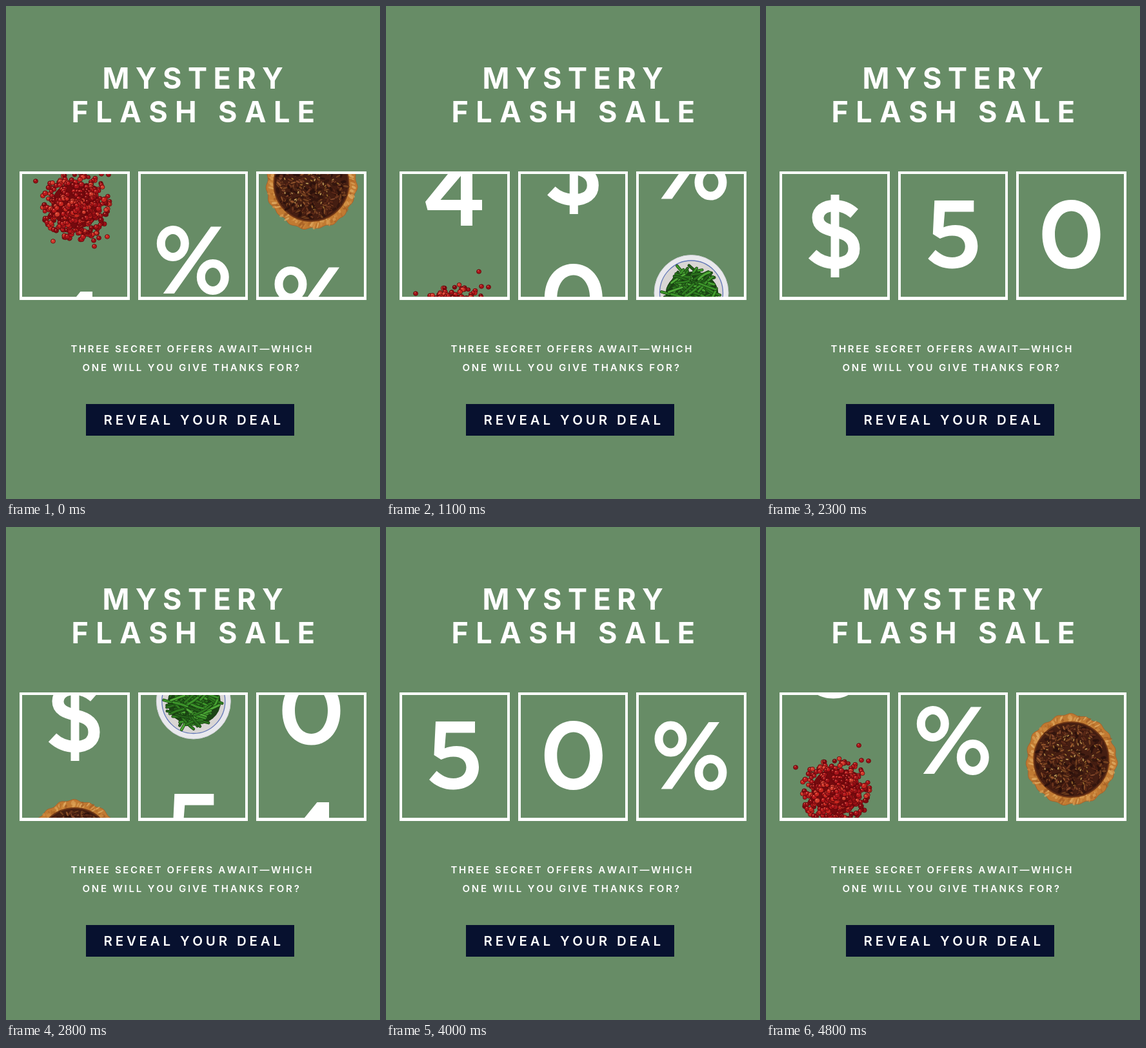
These frames come from a looping animation (580 by 763 pixels, 5100 ms). An HTML page:

```html
<!DOCTYPE html>
<html lang="en">
<head>
<meta charset="utf-8">
<title>Mystery Flash Sale</title>
<style>
  html, body { margin: 0; width: 100%; height: 100%; overflow: hidden; background: #678c66; }
  svg { display: block; width: 100%; height: 100%; }
  text { font-family: Inter, "Open Sans", sans-serif; fill: #fff; font-kerning: none; }
  .title { font-size: 45px; font-weight: 700; }
  .body { font-size: 15px; font-weight: 600; }
  .cta { font-size: 20.5px; font-weight: 600; letter-spacing: 4.8px; }
</style>
</head>
<body>
<svg id="stage" viewBox="0 0 580 763" xmlns="http://www.w3.org/2000/svg">
  <defs>
    <g id="zero" fill="#fff" fill-rule="evenodd">
      <path d="M0-53.5C27-53.5 45-31 45 0S27 53.5 0 53.5-45 31-45 0-27-53.5 0-53.5ZM0-36C-15-36-25.5-21-25.5 0S-15 36 0 36 25.5 21 25.5 0 15-36 0-36Z"/>
    </g>
    <g id="four" fill="#fff" fill-rule="evenodd">
      <path d="M9-52H27.5V12H42.5V28H27.5V52H9.5V28H-42L-45.5 15ZM9.5-25L-22 12H9.5Z"/>
    </g>
    <g id="five" fill="#fff">
      <path d="M-29.5-52.5H31.5V-35H-13.5L-15.5-11C-10-13-4-14.5 3-14.5C23-14.5 37.5-2 37.5 18C37.5 39 22 53-2 53C-18 53-30 47-39.5 37.5L-28 24C-20 31-12 35.5-2 35.5C10 35.5 18 29 18 18.5C18 8 10 2-2 2C-9 2-15 4-21 6.5L-32-.5Z"/>
    </g>
    <g id="dollar" fill="none" stroke="#fff" stroke-width="18">
      <path d="M30.5-32.5C22-40 12-44.5 0-44.5C-17-44.5-26-36-26-26C-26-12-14-8 2-4C20 0 30 7 30 22C30 36 19 44.5 1 44.5C-13 44.5-25 39.5-34.5 30.5"/>
      <path d="M.5-61.5V66.5" stroke-width="13"/>
    </g>
    <g id="percent" fill="none" stroke="#fff" stroke-width="13">
      <ellipse cx="-32" cy="-25.5" rx="18.5" ry="21"/>
      <ellipse cx="30" cy="26.5" rx="18.5" ry="21"/>
      <path d="M27-51.5H43.5L-30 52H-47Z" fill="#fff" stroke="none"/>
    </g>
    <g id="berries"></g>
    <g id="pie"></g>
    <g id="beans"></g>
  </defs>
  <rect width="580" height="763" fill="#678c66"/>
  <g id="reels"></g>
  <text class="title" x="149.5" y="128" letter-spacing="9.4">MYSTERY</text>
  <text class="title" x="101.5" y="180" letter-spacing="11.4">FLASH SALE</text>
  <text class="body" x="100.5" y="536" letter-spacing="2.6">THREE SECRET OFFERS AWAIT—WHICH</text>
  <text class="body" x="118.5" y="565" letter-spacing="2.8">ONE WILL YOU GIVE THANKS FOR?</text>
  <rect x="124" y="616" width="323" height="49" fill="#07112f"/>
  <text class="cta" x="151.5" y="648">REVEAL YOUR DEAL</text>
</svg>
<script>
const byId = id => document.getElementById(id);

function add(parent, tag, attrs) {
  const el = document.createElementNS('http://www.w3.org/2000/svg', tag);
  for (const key in attrs) el.setAttribute(key, attrs[key]);
  return parent.appendChild(el);
}

function seeded(seed) {
  return () => {
    seed = (seed * 1664525 + 1013904223) >>> 0;
    return seed / 4294967296;
  };
}

const pick = (list, rand) => list[Math.floor(rand() * list.length)];
const polar = (r, a) => [r * Math.cos(a), r * Math.sin(a)];

function drawBerries() {
  const g = byId('berries'), rand = seeded(41);
  const reds = ['#b8171b', '#9c1016', '#c9261f', '#820a10', '#d23a2c', '#a9141a'];
  const berry = (x, y, r) => {
    add(g, 'ellipse', { cx: x, cy: y, rx: r, ry: r * 0.94, fill: pick(reds, rand), stroke: '#5c070b', 'stroke-width': 0.8 });
    add(g, 'circle', { cx: x - r * 0.25, cy: y - r * 0.35, r: r * 0.27, fill: '#f07a66', opacity: 0.75 });
  };
  const strays = [[-60.5, -33.5], [37.5, -67.5], [41.5, -44.5], [52.5, -43.5], [-33.5, 59.5],
    [29.5, 58.5], [30.5, 67.5], [37.5, 54.5], [50.5, 52.5]];
  strays.forEach(([x, y]) => berry(x, y, 3.5));
  add(g, 'ellipse', { cx: 2, cy: 4, rx: 38, ry: 36, fill: '#750a0e' });
  Array.from({ length: 330 }, () => [54 * rand() ** 0.6, rand() * Math.PI * 2])
    .sort((a, b) => b[0] - a[0])
    .forEach(([r, a]) => {
      const [x, y] = polar(r, a);
      berry(x + 2, y * 0.97 + 5, 3 + rand() * 1.1);
    });
}

function drawPie() {
  const g = byId('pie'), rand = seeded(7);
  const edge = Array.from({ length: 144 }, (_, i) => {
    const a = i * Math.PI / 72;
    return polar(69.6 + 1.3 * Math.sin(a * 19) + Math.sin(a * 7 + 1), a).map(v => v.toFixed(1));
  });
  add(g, 'path', { d: 'M' + edge.join('L') + 'Z', fill: '#c17a32', stroke: '#a8622a' });
  for (let i = 0; i < 150; i++) {
    const a = rand() * Math.PI * 2, [x, y] = polar(59 + rand() * 9, a);
    add(g, 'ellipse', {
      rx: 2 + rand() * 3, ry: 1 + rand() * 1.5, opacity: 0.7,
      fill: pick(['#dca155', '#d08b40', '#b06a28', '#e2b068', '#a25c24'], rand),
      transform: `translate(${x} ${y}) rotate(${a * 180 / Math.PI + 25})`
    });
  }
  add(g, 'circle', { r: 58, fill: '#451e12', stroke: '#6d3516', 'stroke-width': 2 });
  const nuts = ['#6b351d', '#82472a', '#5a2817', '#2b110c', '#95562c', '#74401f', '#34160f'];
  const seeds = ['#b78a48', '#c9a45e', '#a0712f'];
  for (let i = 0; i < 430; i++) {
    const r = 54 * Math.sqrt(rand()), [x, y] = polar(r, rand() * Math.PI * 2);
    const isSeed = r < 44 && rand() < 0.36;
    add(g, 'ellipse', {
      rx: isSeed ? 2.6 : 3 + rand() * 2.5, ry: isSeed ? 1.3 : 1.3 + rand(),
      fill: pick(isSeed ? seeds : nuts, rand), stroke: '#32140d', 'stroke-width': 0.6,
      transform: `translate(${x} ${y}) rotate(${rand() * 180})`
    });
  }
}

function drawBeans() {
  const g = byId('beans'), rand = seeded(19);
  add(g, 'ellipse', { rx: 57.5, ry: 58.5, fill: '#e9e9ed', stroke: '#d3d4da' });
  add(g, 'ellipse', { rx: 49, ry: 50, fill: '#d9d6d4', stroke: '#6378b8', 'stroke-width': 1.3 });
  add(g, 'ellipse', { cx: 1, cy: 2, rx: 41, ry: 35, fill: '#1c4515' });
  const greens = ['#2f7d20', '#3c942a', '#235f19', '#4fa938', '#2a701d', '#45a030'];
  for (let i = 0; i < 115; i++) {
    const [x, y] = polar(35 * Math.sqrt(rand()), rand() * Math.PI * 2);
    const [dx, dy] = polar(9 + rand() * 6, (rand() - 0.55) * 2);
    const bend = (rand() - 0.5) * 9;
    const d = `M${x - dx} ${y - dy}Q${x} ${y + bend} ${x + dx} ${y + dy}`;
    const line = { d, fill: 'none', 'stroke-linecap': 'round' };
    add(g, 'path', { ...line, stroke: '#163c10', 'stroke-width': 4.6 });
    add(g, 'path', { ...line, stroke: pick(greens, rand), 'stroke-width': 3.2 });
  }
}

// Items sit along a looping strip; stops give its scroll at each beat.
const reels = [
  {
    left: 21, right: 192, center: 106.5, dir: 1, length: 1164.5,
    items: [['four', 0], ['berries', 190.5], ['dollar', 387], ['pie', 584.5], ['five', 782], ['berries', 975]],
    stops: [1024, 1094, 0, 65.5, 146, 226.5, 307, 387, 445, 525, 606, 694, 782, 852, 923]
  },
  {
    left: 205, right: 375, center: 290.8, dir: -1, length: 1185,
    items: [['zero', 0], ['dollar', 197], ['five', 396], ['beans', 592], ['zero', 791.5], ['percent', 988.5]],
    stops: [1028, 1106, 0, 99, 194, 289, 342, 396, 508, 600, 693.5, 742, 791.5, 890, 965]
  },
  {
    left: 388, right: 559, center: 473.5, dir: 1, length: 1167,
    items: [['percent', 0], ['beans', 197.5], ['zero', 398], ['four', 592], ['percent', 789], ['pie', 986]],
    stops: [1064.5, 1116, 0, 107, 193, 280, 339, 398, 467.5, 528, 589.5, 689, 789, 890, 979.5]
  }
];
const MIDDLE = 353.5, LOOP = 5100;
const beats = [0, 300, 600, 1100, 1400, 1700, 2000, 2300, 2800, 3100, 3400, 3700, 4000, 4500, 4800];

function buildReel(reel, i) {
  const { left, right } = reel, width = right - left, root = byId('reels');
  const clip = add(byId('stage').querySelector('defs'), 'clipPath', { id: 'window' + i });
  add(clip, 'rect', { x: left + 2, y: 258, width: width - 4, height: 194 });
  const strip = add(root, 'g', { 'clip-path': `url(#window${i})` });
  reel.nodes = reel.items.map(([id]) => add(strip, 'use', { href: '#' + id }));
  add(root, 'path', {
    d: `M${left} 256H${right}V455H${left}ZM${left + 4} 260V450H${right - 4}V260Z`,
    fill: '#fff', 'fill-rule': 'evenodd'
  });
}

function render(time) {
  const beat = beats.findLastIndex(start => start <= time);
  for (const { items, nodes, stops, length, dir, center } of reels) {
    items.forEach(([, pos], i) => {
      const turn = (pos - stops[beat]) / length;
      const y = MIDDLE + dir * (turn - Math.round(turn)) * length;
      nodes[i].setAttribute('transform', `translate(${center} ${y})`);
      nodes[i].setAttribute('visibility', y > 170 && y < 540 ? 'visible' : 'hidden');
    });
  }
}

drawBerries();
drawPie();
drawBeans();
reels.forEach(buildReel);

const begin = performance.now();
function tick() {
  render((performance.now() - begin) % LOOP);
  requestAnimationFrame(tick);
}
tick();
</script>
</body>
</html>
```
